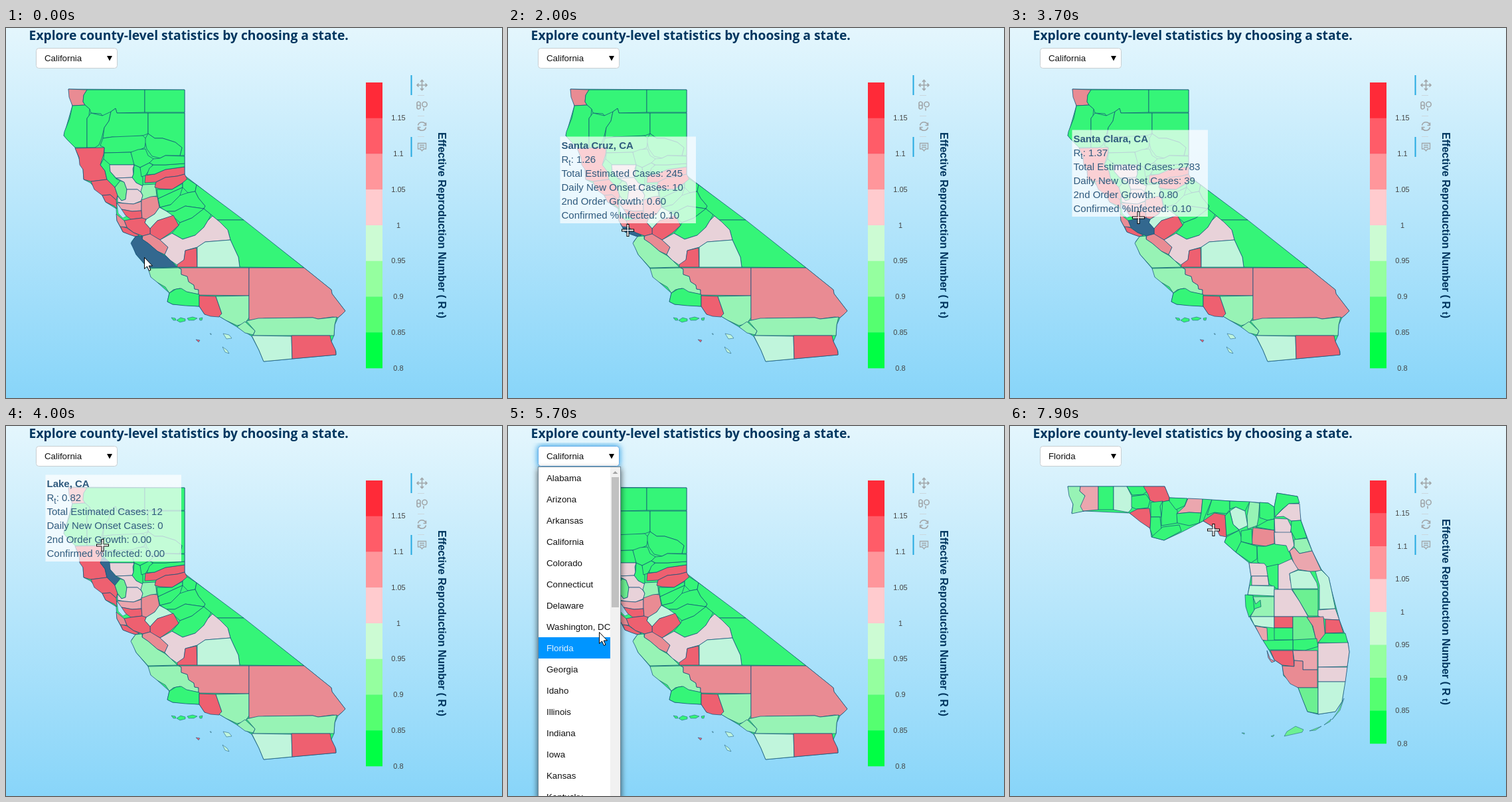
Animation, 747 px wide and 557 px high, one loop 8 s. Source, as an HTML page:

```html
<!DOCTYPE html>
<html lang="en">
<head>
<meta charset="utf-8">
<title>County statistics</title>
<style>
html, body { margin: 0; width: 100%; height: 100%; overflow: hidden; }
svg { display: block; width: 100vw; height: 100vh; font-family: "Liberation Sans", Arial, sans-serif; }
.map path { fill: #35f578; stroke: #12507a; stroke-width: .85; stroke-opacity: .85; stroke-linejoin: round; }
.map .r { fill: #ee6070; }
.map .s { fill: #e98b93; }
.map .q { fill: #eba6ae; }
.map .p { fill: #e8d2d9; }
.map .l { fill: #97f3b5; }
.map .m { fill: #c0f5dc; }
.map .g { fill: #6cf092; }
.map .water { fill: #b9e4fa; stroke-width: .5; }
.map .isle { stroke-width: .6; }
.map path.hover { fill: #33688f; }
.ui { font-size: 13.3px; fill: #111; }
.tick { font-size: 11px; fill: #444; text-anchor: middle; }
.axis { font-size: 16px; font-weight: bold; fill: #00365f; text-anchor: middle; }
.icon { fill: none; stroke: #a1a6a9; stroke-width: 1.6; }
#tip { font-size: 15px; fill: #2f5a7d; }
</style>
</head>
<body>
<svg id="stage" viewBox="0 0 747 557" preserveAspectRatio="none">
<defs>
  <linearGradient id="sky" x1="0" y1="0" x2="0" y2="1"><stop stop-color="#e4f6fd"/><stop offset="1" stop-color="#88d5f9"/></linearGradient>
  <filter id="shadow" x="-30%" y="-10%" width="160%" height="120%"><feGaussianBlur stdDeviation="4"/></filter>
</defs>
<rect width="747" height="557" fill="url(#sky)"/>
<text x="34.6" y="18" font-family="'Open Sans', sans-serif" font-weight="700" font-size="19.27" fill="#00365f">Explore county-level statistics by choosing a state.</text>

<g id="ca" class="map">
  <path d="M94 92 269 93 269 222 449 361 490 394 491 400 511 426 506 431 500 436 495 447 494 463 490 472 497 487 497 492 388 502 381 485 370 464 348 450 321 434 299 431 291 419 251 416 243 412 246 399 228 383 214 362 196 341 189 322 195 314 176 307 167 290 166 272 150 262 145 252 127 233 117 228 116 213 104 180 87 162 100 117Z"/>
  <path class="s" d="M94 92 122 93 117 101 116 111 119 116 100 117 95 104Z"/>
  <path d="M122 93 209 93 209 127 167 128 165 121 158 126 155 131 145 132 143 129 128 128 126 122 119 116 116 111 117 101Z"/>
  <path d="M209 93 269 93 269 127 209 127Z"/>
  <path d="M100 117 119 116 126 122 125 132 122 136 122 180 104 180 92 168 87 162 88 156 96 136Z"/>
  <path id="trinity" d="M125 132 128 128 145 132 158 126 155 140 148 150 144 166 140 176 134 180 122 180 122 136Z"/>
  <path d="M158 126 165 121 167 128 214 128 214 159 206 162 176 165 160 164 146 166 148 150 155 140Z"/>
  <path d="M214 128 269 128 269 192 262 192 265 180 255 172 236 166 224 166 214 159Z"/>
  <path d="M146 166 160 164 206 162 210 166 214 168 210 173 209 180 195 186 188 187 148 188 148 180 142 177Z"/>
  <path d="M210 166 214 159 224 166 236 166 255 172 265 180 262 192 240 192 232 196 220 193 212 182 210 173Z"/>
  <path class="r" d="M104 181 148 180 147 190 142 206 149 215 152 228 128 231 117 228 116 213 111 206 110 195Z"/>
  <path d="M148 188 188 187 192 200 193 206 156 206 147 197Z"/>
  <path d="M188 187 199 183 210 182 214 192 222 197 216 203 202 210 193 206Z"/>
  <path id="lake" d="M147 197 157 206 157 216 166 227 172 230 164 240 152 228 149 215 142 206Z"/>
  <path class="p" d="M156 206 193 206 191 212 192 220 190 225 166 226 157 216Z"/>
  <path d="M193 206 202 210 206 225 206 238 196 233 190 225 192 220Z"/>
  <path class="r" d="M128 231 152 228 164 240 168 252 166 259 157 251 145 252 133 243Z"/>
  <path id="napa" class="g" d="M164 240 172 230 178 232 182 243 180 258 174 260 168 252Z"/>
  <path class="p" d="M166 226 190 225 196 233 206 238 203 247 198 243 182 243 178 232Z"/>
  <path class="p" d="M168 253 174 260 180 258 182 243 198 243 203 247 206 252 204 260 192 265 178 264 168 262Z"/>
  <path class="r" d="M145 252 157 251 166 259 167 272 163 268 150 262Z"/>
  <path class="water" d="M167 264 174 272 182 283 176 286 169 279Z"/>
  <path class="q" d="M167 263 178 264 192 265 204 261 204 275 190 276 174 273Z"/>
  <path id="alameda" class="r" d="M174 273 190 276 204 275 205 286 188 288 180 282Z"/>
  <path class="s" d="M204 258 218 253 228 254 231 270 224 280 211 288 205 287 204 274Z"/>
  <path class="l" d="M206 236 225 235 227 253 218 254 204 259 206 252 203 246Z"/>
  <path class="r" d="M210 222 224 220 240 213 269 209 269 220 258 223 240 225 226 232 209 233Z"/>
  <path class="r" d="M226 232 240 225 258 223 269 220 273 228 266 233 250 243 232 242 224 240Z"/>
  <path d="M202 210 216 203 221 206 215 215 210 222 204 224Z"/>
  <path d="M216 211 222 206 240 206 269 204 269 209 240 213 224 220 212 221Z"/>
  <path d="M222 197 232 196 240 192 269 193 269 204 240 206 222 206 216 203Z"/>
  <path d="M227 243 250 243 266 234 266 240 244 250 229 257Z"/>
  <path d="M229 257 244 250 266 240 262 252 248 266 232 270Z"/>
  <path d="M266 233 273 227 287 236 285 246 274 248 266 240Z"/>
  <path d="M232 270 248 266 262 252 274 248 285 246 290 256 300 268 298 272 270 268 254 276 242 276Z"/>
  <path d="M242 276 254 276 270 268 298 272 280 286 262 293 252 284Z"/>
  <path d="M262 293 280 286 298 272 309 281 304 290 298 300 285 312 266 318 250 309 260 297Z"/>
  <path d="M287 236 358 289 318 289 309 281 298 272 300 268 290 256 285 246Z"/>
  <path d="M318 289 358 289 449 361 352 360 350 345 338 319 334 304Z"/>
  <path class="m" d="M209 293 211 288 224 280 231 270 242 276 252 283 228 290 217 302Z"/>
  <path class="r" d="M217 302 228 290 252 282 260 297 248 308 232 319 217 311Z"/>
  <path id="clara" class="r" d="M178 290 188 288 205 286 211 288 209 293 217 302 217 310 206 313 192 308 182 300Z"/>
  <path id="cruz" class="r" d="M172 298 182 301 192 308 201 312 195 314 186 311 176 307Z"/>
  <path class="s" d="M166 280 172 285 178 290 182 300 172 299 167 290Z"/>
  <path class="s" d="M206 313 217 310 232 319 244 330 239 341 228 336 214 324 205 318Z"/>
  <path id="monterey" class="l" d="M195 314 205 313 205 318 214 324 228 336 240 343 248 350 258 360 214 361 205 351 196 341 191 330 188 324Z"/>
  <path class="p" d="M311 283 322 292 334 304 338 319 300 322 288 330 270 335 268 350 258 357 248 350 239 341 244 330 232 319 250 309 266 318 285 312 298 300 304 290Z"/>
  <path class="r" d="M270 335 287 331 288 360 258 360 258 356 268 349Z"/>
  <path class="m" d="M288 330 300 322 338 319 343 330 350 345 352 360 288 360Z"/>
  <path class="l" d="M214 362 260 361 264 363 264 371 273 374 275 382 283 387 284 393 290 394 290 401 270 397 262 392 252 394 246 399 240 390 228 383 218 375Z"/>
  <path class="s" d="M260 361 366 361 366 403 290 402 290 394 284 393 283 387 275 382 273 374 264 371 264 363Z"/>
  <path d="M246 399 256 393 264 392 272 397 291 401 291 419 270 418 251 416 243 412Z"/>
  <path class="r" d="M291 403 316 404 325 430 321 435 308 434 299 431 291 419Z"/>
  <path class="l" d="M316 404 366 403 366 436 360 445 348 448 331 440 321 434 325 430Z"/>
  <path class="s" d="M366 361 449 361 490 394 491 400 511 426 506 431 500 436 492 435 470 438 462 436 390 437 366 440Z"/>
  <path class="l" d="M362 441 380 437 462 436 470 438 498 435 495 447 494 463 372 463 375 456Z"/>
  <path class="l" d="M348 450 360 442 375 456 372 462 360 459Z"/>
  <path class="m" d="M370 463 430 464 431 498 388 502 381 485Z"/>
  <path class="r" d="M430 463 488 463 490 472 496 484 497 492 431 498Z"/>
  <path class="isle" d="M249 436l6 1 1 3-4 0zM257 440l6-4 7 2 0 3-8 2zM273 437l8-2 7 2-5 3-8 0zM291 437l5-1-1 4-3 0z"/>
  <path class="r isle" d="M286 469l6 1-2 3z"/>
  <path class="m isle" d="M327 460l9 2 4 5-8 1zM326 480l7 5 3 5-6-2zM307 460h2v2z"/>
</g>

<g id="fl" class="map">
  <path d="M87 91 233 91 240 108 389 116 398 122 402 101 433 106 438 142 455 188 469 216 480 228 484 246 496 292 509 326 511 340 508 362 500 415 490 430 464 434 448 430 434 394 412 376 410 360 398 352 390 337 362 290 358 254 363 226 360 206 340 190 323 175 326 167 311 155 291 143 258 160 232 172 213 167 211 154 180 131 112 128 93 131 95 118Z"/>
  <path class="l" d="M87 91 106 91 105 98 113 105 110 118 112 128 93 132 95 118 89 105Z"/>
  <path class="q" d="M106 91 133 91 133 126 110 128 106 121 113 105 105 98Z"/>
  <path d="M133 91 156 91 156 126 133 126Z"/>
  <path class="m" d="M156 91 176 91 183 105 186 118 182 126 178 130 156 126Z"/>
  <path d="M176 91 203 91 206 99 200 103 184 104 179 96Z"/>
  <path d="M183 106 205 103 211 112 208 123 190 125 183 122Z"/>
  <path class="r" d="M201 91 233 91 240 108 240 112 222 116 211 112 208 103Z"/>
  <path class="r" d="M180 131 192 125 210 124 212 137 211 154 196 144Z"/>
  <path d="M212 115 230 113 226 121 228 137 212 137Z"/>
  <path d="M212 137 226 137 229 165 215 167 211 155Z"/>
  <path d="M230 114 240 112 252 127 252 146 228 150 228 137Z"/>
  <path d="M240 108 267 109 263 120 250 126 240 113Z"/>
  <path class="q" d="M268 109 290 110 288 131 270 130 251 132 263 121Z"/>
  <path d="M251 132 270 130 288 131 285 146 270 150 252 146Z"/>
  <path d="M213 167 230 152 255 149 258 158 232 172Z"/>
  <path d="M290 110 304 111 297 128 291 143 285 146 288 131Z"/>
  <path d="M304 111 331 113 331 126 326 132 308 130 297 134Z"/>
  <path class="r" d="M291 143 308 131 324 134 326 167 316 165 311 155Z"/>
  <path d="M331 113 361 114 354 128 340 122 331 125Z"/>
  <path class="m" d="M331 128 340 122 354 128 358 150 345 156 336 148Z"/>
  <path class="l" d="M361 114 376 116 374 140 372 150 358 155 357 135Z"/>
  <path d="M324 135 331 128 336 148 345 157 326 165Z"/>
  <path d="M326 167 345 157 350 172 340 190 323 175Z"/>
  <path d="M376 115 389 116 398 122 398 140 388 142 376 138Z"/>
  <path d="M398 122 402 101 433 106 436 116 420 117 410 125 399 137Z"/>
  <path class="p" d="M399 137 410 126 420 117 436 117 438 142 424 143 412 136Z"/>
  <path class="p" d="M398 139 418 140 424 152 422 162 399 160Z"/>
  <path d="M424 143 438 142 447 168 430 171 423 158Z"/>
  <path d="M370 152 388 142 398 140 398 157Z"/>
  <path class="s" d="M366 153 398 157 398 177 385 181 364 178Z"/>
  <path d="M348 158 364 155 365 178 348 174Z"/>
  <path d="M340 190 348 174 372 181 372 200 363 206Z"/>
  <path d="M372 181 385 181 399 177 418 180 424 200 418 208 386 212 373 205Z"/>
  <path class="p" d="M398 160 424 160 428 180 420 190 416 180 399 178Z"/>
  <path class="l" d="M428 171 447 169 455 188 436 192 428 182Z"/>
  <path class="q" d="M421 188 428 183 436 192 455 188 469 218 452 219 434 216 428 208Z"/>
  <path class="p" d="M360 206 383 207 391 218 388 226 363 226Z"/>
  <path d="M386 212 404 208 404 246 390 238Z"/>
  <path class="p" d="M364 226 388 226 390 240 364 240Z"/>
  <path class="m" d="M361 240 398 241 398 256 358 254Z"/>
  <path class="p" d="M404 209 424 200 434 216 421 222 422 232 426 246 404 246Z"/>
  <path class="m" d="M421 222 434 217 452 219 462 236 464 245 424 245Z"/>
  <path class="g" d="M425 246 464 246 464 286 449 286 436 264Z"/>
  <path class="m" d="M460 219 469 217 480 228 484 246 490 275 466 276 466 240Z"/>
  <path class="p" d="M464 277 490 275 496 292 475 291 464 286Z"/>
  <path d="M354 254 366 255 368 278 360 288 355 272Z"/>
  <path class="l" d="M366 257 398 257 398 287 362 287 369 275 378 272 377 262 370 268Z"/>
  <path class="p" d="M398 246 424 246 436 264 449 287 398 287Z"/>
  <path class="m" d="M362 287 398 287 398 304 378 302 368 300Z"/>
  <path class="q" d="M369 301 387 304 388 324 380 322Z"/>
  <path class="r" d="M398 287 426 287 426 304 398 304Z"/>
  <path d="M398 304 426 304 426 322 398 322Z"/>
  <path class="g" d="M426 287 447 287 455 300 462 325 426 324Z"/>
  <path class="s" d="M447 288 472 287 475 320 462 327 456 301Z"/>
  <path class="r" d="M475 291 496 292 502 311 475 312Z"/>
  <path d="M464 326 475 312 505 312 509 327Z"/>
  <path d="M426 322 462 320 464 332 444 338 426 337Z"/>
  <path d="M381 323 426 322 426 337 390 337Z"/>
  <path class="r" d="M392 338 426 338 428 362 410 360 398 352Z"/>
  <path class="q" d="M426 338 463 338 463 367 441 367 441 354 428 353Z"/>
  <path class="p" d="M464 327 509 326 511 340 508 362 464 363Z"/>
  <path class="p" d="M464 363 508 363 505 385 464 385Z"/>
  <path class="s" d="M410 361 428 362 428 353 441 354 441 367 463 367 463 394 434 394 422 388 412 374Z"/>
  <path class="g" d="M434 394 464 394 464 433 448 430 440 410Z"/>
  <path class="m" d="M464 385 505 385 500 415 490 430 464 434Z"/>
  <path class="g isle" d="M503 410 497 428 485 442 494 429ZM484 441l-11 9 9-5zM469 452l-18 7 9-1zM413 467 417 460 430 452 442 457 440 461ZM393 467l5-2-2 3zM349 462h4v2z"/>
  <path class="s" d="M387 338 389 349 394 356 399 354 392 351Z"/>
</g>

<g fill="#26aae1"><path d="M609.5 71h2v30h-2zM609.5 164h2v30h-2z"/></g>
<g class="icon" transform="translate(0 -.5)">
  <path stroke="#cbd8de" stroke-width="1" d="M620 102h10M620 133h10M620 164h10"/>
  <path d="M619 86.500h15M626.500 79v15M624 81.500l2.500-2.500 2.500 2.500M624 91.500l2.500 2.500 2.500-2.500M621.500 84l-2.500 2.500 2.500 2.500M631.500 84l2.500 2.500-2.500 2.500"/>
  <path d="M619 113q2-3 5 0v8q-3 3-5 0zM619 117h5M629 121v4"/><circle cx="630.500" cy="115.500" r="3.700"/>
  <path d="M620.500 147a6.200 6.200 0 0 1 11.500-1.500M632.500 143v4h-4M632.500 150a6.200 6.200 0 0 1-11.500 1.500M620.500 154v-4h4"/>
  <path d="M620.500 174h12v8.500h-3.500l-2.500 3-2.500-3h-3.500zM623 177h7M623 180h7" stroke-width="1.300"/>
</g>

<rect id="glow" x="44" y="29" width="125" height="33" rx="5" fill="#3da5e5" filter="url(#shadow)"/>
<rect id="box" x="45.500" y="30.500" width="122" height="30" rx="4" fill="#fff"/>
<text id="choice" class="ui" x="58" y="50"></text>
<path d="M152 42h8l-4 7.500z"/>

<g id="list">
  <rect x="44" y="64" width="127" height="500" opacity=".55" filter="url(#shadow)"/>
  <rect x="45.500" y="61.500" width="124" height="500" fill="#fff" stroke="#6f8796"/>
  <rect id="row" x="46" width="108" height="32" fill="#0095ff"/>
  <path fill="#f1f1f1" d="M154 62h15v500h-15z"/>
  <path fill="#c1c1c1" d="M156 77h11v196h-11z"/>
  <path fill="#a3a3a3" d="M157.500 72h8l-4-4z"/>
</g>

<g id="tip"><rect width="204.500" height="130.500" fill="#fff" opacity=".7"/></g>
<path id="arrow" fill="#fff" stroke="#000" d="M.5.5V17.500L4.500 14 7.500 20.500 10 19.300 7.200 13H12.500Z"/>
<g id="cross" fill="none"><path stroke="#000" stroke-width="4" d="M-9.500 0h7.500M2 0h7.500M0-9.500v7.500M0 2v7.500"/><path stroke="#fff" stroke-width="2" d="M-8.500 0h6M2.500 0h6M0-8.500v6M0 2.500v6"/><path stroke="#fff" d="M-2.500 0h5M0-2.500v5"/></g>
</svg>

<script>
const $ = id => document.getElementById(id);
const LOOP = 8000, STEP = 100, ROW = 32, TOP = 62;

function add(parent, tag, attrs, text = '') {
  const el = document.createElementNS('http://www.w3.org/2000/svg', tag);
  for (const k in attrs) el.setAttribute(k, attrs[k]);
  el.textContent = text;
  return parent.appendChild(el);
}
const show = (id, on) => $(id).setAttribute('display', on ? 'inline' : 'none');
const move = (id, x, y) => $(id).setAttribute('transform', `translate(${x} ${y})`);

const bands = ['#ff2a38', '#ff5c68', '#ff969b', '#ffcbce', '#ccfbd3', '#95ff9f', '#55ff70', '#00ff44'];
function legend(map, height) {
  const h = height / bands.length;
  bands.forEach((fill, i) => {
    const y = 82 + i * h;
    add(map, 'rect', { x: 542, y, width: 25, height: h + .3, fill });
    add(map, 'text', { class: 'tick', x: 591, y: y + h + 3.5 }, String(+(1.15 - i * .05).toFixed(2)));
  });
  const at = `translate(651 ${82 + height / 2}) rotate(90)`;
  const title = add(map, 'text', { class: 'axis', transform: at }, 'Effective Reproduction Number ( R ');
  add(title, 'tspan', { 'font-size': 13 }, 't');
  add(title, 'tspan', {}, ')');
}
legend($('ca'), 430);
legend($('fl'), 396);

const states = ['Alabama', 'Arizona', 'Arkansas', 'California', 'Colorado', 'Connecticut', 'Delaware', 'Washington, DC',
  'Florida', 'Georgia', 'Idaho', 'Illinois', 'Indiana', 'Iowa', 'Kansas', 'Kentucky'];
const items = states.map((s, i) => add($('list'), 'text', { class: 'ui', x: 58, y: TOP + 21 + i * ROW }, s));

// name, Rt, cases, daily cases, growth, % infected
const counties = {
  monterey: ['Monterey', '0.95', 409, 5, '0.00', '0.10'],
  cruz: ['Santa Cruz', '1.26', 245, 10, '0.60', '0.10'],
  clara: ['Santa Clara', '1.37', 2783, 39, '0.80', '0.10'],
  alameda: ['Alameda', '1.14', 2492, 48, '0.30', '0.10'],
  napa: ['Napa', '0.88', 96, 2, '0.00', '0.10'],
  lake: ['Lake', '0.82', 12, 0, '0.00', '0.00'],
  trinity: ['Trinity', '0.80', 2, 0, '0.00', '0.00']
};
const hovers = [[0, 'monterey'], [1900, ''], [2000, 'cruz'], [3000, 'clara'], [3800, 'alameda'],
  [3900, 'napa'], [4000, 'lake'], [4100, 'trinity'], [4300, '']];

const lines = [0, 1, 2, 3, 4, 5].map(i =>
  add($('tip'), 'text', { x: 2, y: 18 + i * 21, 'font-weight': i ? 400 : 700 }));

function fillTip([name, rt, cases, daily, growth, infected]) {
  lines[0].textContent = name + ', CA';
  lines[1].textContent = 'R';
  add(lines[1], 'tspan', { dy: 4, 'font-size': 12 }, 't');
  add(lines[1], 'tspan', { dy: -4 }, ': ' + rt);
  lines[2].textContent = 'Total Estimated Cases: ' + cases;
  lines[3].textContent = 'Daily New Onset Cases: ' + daily;
  lines[4].textContent = '2nd Order Growth: ' + growth;
  lines[5].textContent = 'Confirmed %Infected: ' + infected;
}

// pointer path: time, x, y
const path = [[0, 208, 346], [1200, 208, 346], [1500, 192, 330], [1700, 192, 330],
  [1900, 180, 304], [2700, 180, 304], [3100, 195, 294], [3600, 195, 294], [3700, 193, 285],
  [4100, 129, 143], [4200, 125, 90], [4400, 122, 43], [5200, 122, 43], [5300, 124, 61],
  [5500, 135, 170], [5700, 137, 311], [5800, 134, 335], [6000, 127, 348], [6100, 127, 348],
  [6400, 120, 337], [7200, 120, 337], [7300, 122, 361], [7400, 138, 345], [7600, 215, 245],
  [7800, 293, 165], [7900, 306, 156]];

function pointer(t) {
  const i = path.findIndex(p => p[0] > t);
  if (i < 0) return path[path.length - 1].slice(1);
  if (i === 0) return path[0].slice(1);
  const [a, b] = [path[i - 1], path[i]];
  const k = (t - a[0]) / (b[0] - a[0]);
  return [1, 2].map(n => Math.round(a[n] + (b[n] - a[n]) * k));
}

let last = -1, lit = '';
function draw(time) {
  const t = Math.floor(time % LOOP / STEP) * STEP;
  if (t === last) return;
  last = t;
  const florida = t >= 6700, open = t >= 4600 && !florida;
  show('ca', !florida);
  show('fl', florida);
  show('list', open);
  show('glow', open);
  $('box').setAttribute('stroke', open ? '#66afe9' : '#c8ced1');
  $('choice').textContent = florida ? 'Florida' : 'California';

  if (open) {
    // the highlighted row runs one step ahead of the drawn pointer
    const y = pointer(t + STEP)[1];
    const n = y < TOP ? 3 : Math.floor((y - TOP) / ROW);
    $('row').setAttribute('y', TOP + n * ROW);
    items.forEach((el, i) => { el.style.fill = i === n ? '#e4f3ff' : ''; });
  }

  const id = hovers.filter(h => h[0] <= t).pop()[1];
  if (id !== lit) {
    if (lit) $(lit).classList.remove('hover');
    if (id) {
      $(id).classList.add('hover');
      fillTip(counties[id]);
    }
    lit = id;
  }
  show('tip', id && t >= STEP);
  const [tx, ty] = pointer(t - STEP);
  move('tip', tx - 102 + .5, ty - 141 + .5);

  const cross = t >= STEP && t <= 4200 || t >= 7300;
  const [x, y] = pointer(t);
  show('cross', cross);
  show('arrow', !cross);
  move('cross', x + .5, y + .5);
  move('arrow', x, y - 1);
}

const start = performance.now();
function tick() {
  draw(performance.now() - start);
  requestAnimationFrame(tick);
}
tick();
</script>
</body>
</html>
```
